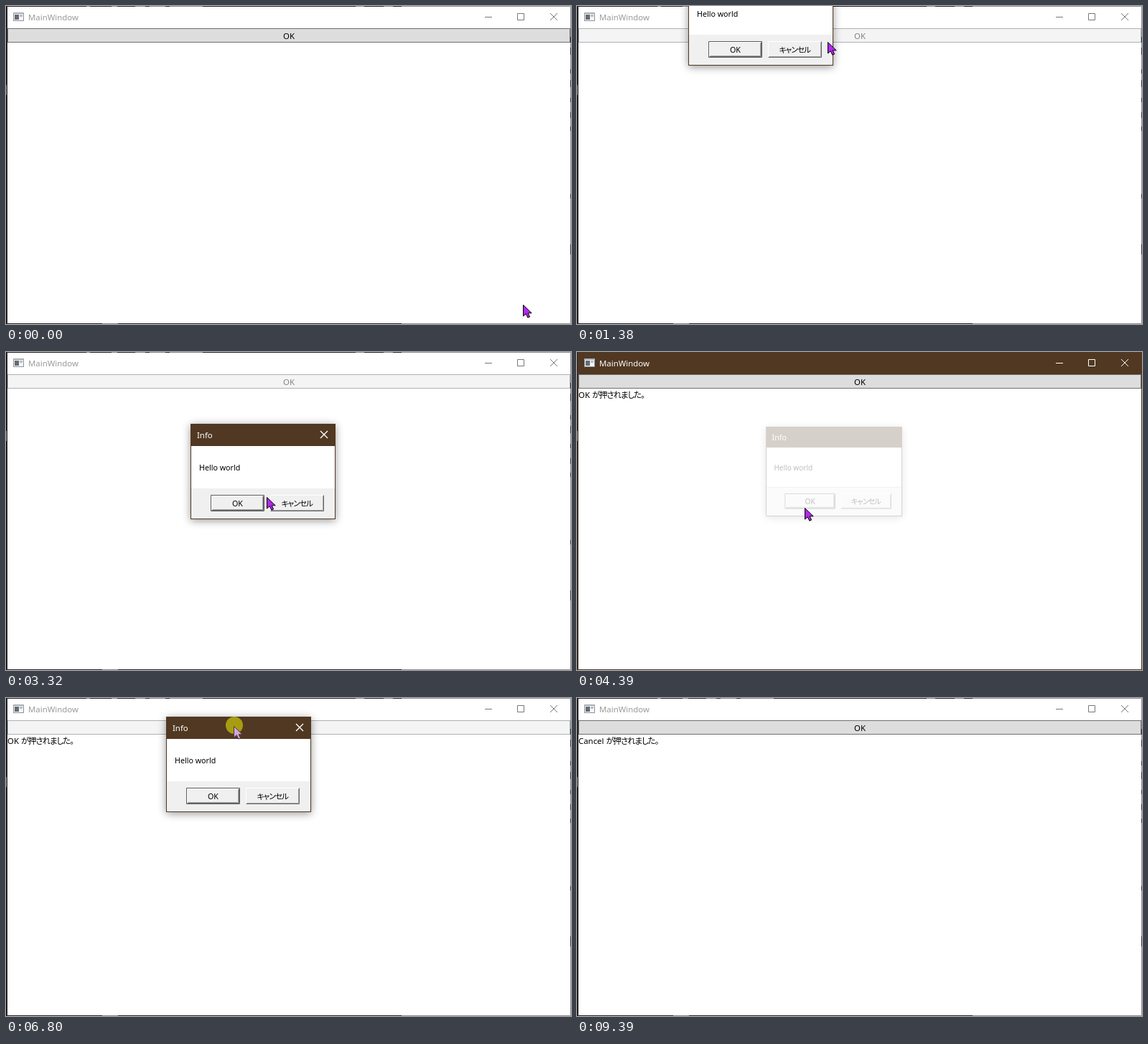
An HTML page for the animation above (9540 ms loop, 787 by 443 pixels).

```html
<!DOCTYPE html>
<html lang="ja">
<head>
<meta charset="utf-8">
<style>
html, body { margin: 0; width: 100%; height: 100%; overflow: hidden; background: #fff; }
svg { display: block; }
text { font: 11.4px "Noto Sans", "Open Sans", sans-serif; white-space: pre; }
.small text { font-size: 10.7px; }
text .jp { font-family: "Noto Sans CJK JP", "Noto Sans CJK", sans-serif; font-feature-settings: "palt"; letter-spacing: -1px; }
.line { fill: none; stroke-width: 1; }
#dialog { filter: drop-shadow(0 2px 6px rgba(0, 0, 0, .42)); }
</style>
</head>
<body>
<svg width="787" height="443" viewBox="0 0 787 443">
  <rect width="787" height="443" fill="#fff"/>

  <!-- window edges with the dark desktop showing behind them -->
  <path d="M0 0H551V1H0ZM0 0H2V443H0ZM0 442H551V443H0Z" fill="#222024"/>
  <path d="M551 .5H786.5V442.5H551" class="line" stroke="#8c8c8c"/>
  <path d="M112 .5h5M147 .5h8M180 .5h14M200 .5h22M228 .5h46M487 .5h12M526 .5h13M134 442.5h22M.5 110v14" class="line" stroke="#858585"/>
  <path d="M786.5 43v8M786.5 58v10M786.5 88v6M786.5 103v10M786.5 128v6M786.5 148v8M786.5 168v6M786.5 262v6M786.5 332v14" class="line" stroke="#333"/>

  <g id="active">
    <rect x="1" width="786" height="31" fill="#513822"/>
    <rect x="1.5" y=".5" width="785" height="442" class="line" stroke="#513822"/>
  </g>
  <g>
    <rect x="10.5" y="9.5" width="14" height="11" fill="#f4f5f7" stroke="#8d939b"/>
    <path d="M10 9h15v2H10z" fill="#a9aeb6"/>
    <path d="M12 12h6v7h-6z" fill="#666b73"/>
    <path d="M19 12h4v3h-4z" fill="#b9bec5"/>
  </g>
  <text id="title" x="31" y="20">MainWindow</text>
  <path id="caption" class="line" d="M667 15.5h10M712.5 10.5h9v9h-9zM758 10l10 10M768 10l-10 10"/>

  <rect id="button" x="2.5" y="31.5" width="783" height="19"/>
  <text id="label" x="394" y="46" text-anchor="middle">OK</text>
  <text id="message" x="2" y="64" fill="#000"><tspan id="answer"></tspan><tspan class="jp">が押されました。</tspan></text>

  <g id="dialog">
    <rect id="frame" width="202" height="133"/>
    <rect x="1" y="31" width="200" height="59" fill="#fff"/>
    <rect x="1" y="90" width="200" height="42" fill="#f0f0f0"/>
    <text x="9" y="20" fill="#fff">Info</text>
    <path id="close" class="line" d="M181 10l10 10M191 10l-10 10" stroke="#fff" style="stroke-width:1.4"/>
    <g class="small">
      <text x="12" y="65">Hello world</text>
      <g id="ok" transform="translate(28 99)"></g>
      <g id="cancel" transform="translate(111 99)"></g>
      <text x="65.5" y="115" text-anchor="middle">OK</text>
      <text x="126.5" y="115"><tspan class="jp">キャンセル</tspan></text>
    </g>
  </g>

  <circle id="press" r="12" fill="#ff0" fill-opacity=".5"/>
  <path id="cursor" d="M.5 .5V16L4.3 12.7L6.8 18.2L9.6 17L7.2 11.8H12.2Z" stroke="#000"/>
</svg>
<script>
const LOOP = 9540;
const el = {};
document.querySelectorAll('[id]').forEach(e => el[e.id] = e);

const set = (e, attrs) => { for (const k in attrs) e.setAttribute(k, attrs[k]); };
const within = (t, ...spans) => spans.some(([a, b]) => t >= a && t < b);
const ramp = (t, a, b) => Math.min(1, Math.max(0, (t - a) / (b - a)));
const show = (e, on) => set(e, { visibility: on ? 'visible' : 'hidden' });

// time, x, y, eased
const pointer = [
  [40, 720, 416], [480, 366, 44, 1], [1250, 366, 44], [1380, 349, 50],
  [1560, 290, 13], [1740, 290, 13], [1840, 290, -30], [2680, 290, -30],
  [2930, 392, 120], [3130, 392, 120], [3320, 363, 202], [3600, 310, 222],
  [3650, 317, 217], [4400, 317, 217], [4950, 361, 48, 1], [5620, 361, 48],
  [6000, 249, -37], [6700, 249, -37], [6915, 393, 124], [7080, 393, 124],
  [7200, 446, 231], [7310, 446, 221], [8470, 446, 221], [9030, 750, 446]
];
const presses = [[760, 870], [2600, 3080], [3930, 4060], [5140, 5250], [6600, 7080], [7670, 7790]];
const drags = [[2680, 2930], [6700, 6915]];
const dialogs = [
  { open: 1070, end: 4240, drag: drags[0], x: 257, y: 100 },
  { open: 5450, end: 7930, drag: drags[1], x: 299, y: 111 }
];

function pointerAt(t) {
  const i = pointer.findIndex(p => p[0] > t);
  if (i < 0) return pointer[pointer.length - 1].slice(1);
  if (!i) return pointer[0].slice(1);
  const [a, b] = [pointer[i - 1], pointer[i]];
  let u = ramp(t, a[0], b[0]);
  if (b[3]) u = u * u * (3 - 2 * u);
  return [1, 2].map(k => a[k] + (b[k] - a[k]) * u);
}

// Classic raised button, 75 by 23
function classicButton(e, isDefault, pressed) {
  const edge = (d, c) => `<path class="line" d="${d}" stroke="${c}"/>`;
  const i = isDefault ? 1 : 0, r = 74.5 - i, b = 22.5 - i, s = i + .5;
  e.innerHTML = '<rect width="75" height="23" fill="#f0f0f0"/>' +
    (pressed
      ? edge('M1.5 1.5H73.5V21.5H1.5Z', '#a0a0a0')
      : edge(`M${s} ${b}V${s}H${r}`, '#fff') +
        edge(`M${s + 1} ${b - 1}H${r - 1}V${s + 1}`, '#a0a0a0') +
        edge(`M${s} ${b}H${r}V${s}`, '#696969')) +
    (isDefault ? edge('M.5 .5H74.5V22.5H.5Z', '#5c5c5c') : '');
}

function drawWindow(t, y) {
  const active = within(t, [760, 950], [5000, 5330]) ? 1
    : t >= 4240 && t < 5000 ? ramp(t, 4260, 4360)
    : t >= 7980 && t < 9390 ? ramp(t, 7980, 8080) : 0;
  set(el.active, { opacity: active });
  set(el.title, { fill: active > .5 ? '#fff' : '#999' });
  set(el.caption, { stroke: active > .5 ? '#fff' : '#777' });

  const disabled = within(t, [950, 4240], [5330, 7930]);
  const hover = y >= 31 && y < 51;
  const [fill, stroke] = disabled ? ['#f4f4f4', '#adb2b5']
    : hover && within(t, ...presses) ? ['#c4e5f6', '#2c628b']
    : hover ? ['#bee6fd', '#3c7fb1'] : ['#ddd', '#707070'];
  set(el.button, { fill, stroke });
  set(el.label, { fill: disabled ? '#838383' : '#000' });

  show(el.message, t >= 4240);
  el.answer.textContent = t < 7930 ? 'OK ' : 'Cancel ';
}

function drawDialog(t) {
  const d = dialogs.find(d => t >= d.open && t < d.end + 190);
  show(el.dialog, d);
  show(el.close, d && t < d.end);
  if (!d) return;
  const u = ramp(t, ...d.drag);
  const x = Math.round(155 + (d.x - 155) * u);
  const y = Math.round(-50 + (d.y + 50) * u);
  const seen = Math.min(ramp(t, d.open, d.open + 150), 1 - ramp(t, d.end + 30, d.end + 190));
  const closing = t >= d.end;
  set(el.dialog, {
    opacity: seen,
    transform: `translate(${x + 101} ${y + 66.5}) scale(${.92 + .08 * seen}) translate(-101 -66.5)`
  });
  set(el.frame, { fill: closing ? '#5a442f' : '#513822' });
  const onCancel = t >= 7670;
  classicButton(el.ok, !onCancel, within(t, [3930, 4060]));
  classicButton(el.cancel, onCancel, within(t, [7670, 7790]));
}

function draw(now) {
  const t = now % LOOP;
  const [x, y] = pointerAt(t).map(Math.round);
  drawWindow(t, y);
  drawDialog(t);
  show(el.press, within(t, ...presses));
  set(el.press, { cx: x + 1, cy: y - 1 });
  const dragging = within(t, ...drags);
  set(el.cursor, {
    transform: `translate(${x} ${y})`,
    fill: dragging ? '#d3a6d6' : '#b428f0',
    stroke: dragging ? '#4a3a44' : '#000'
  });
}

const start = performance.now();
function tick() {
  draw(performance.now() - start);
  requestAnimationFrame(tick);
}
tick();
</script>
</body>
</html>
```
